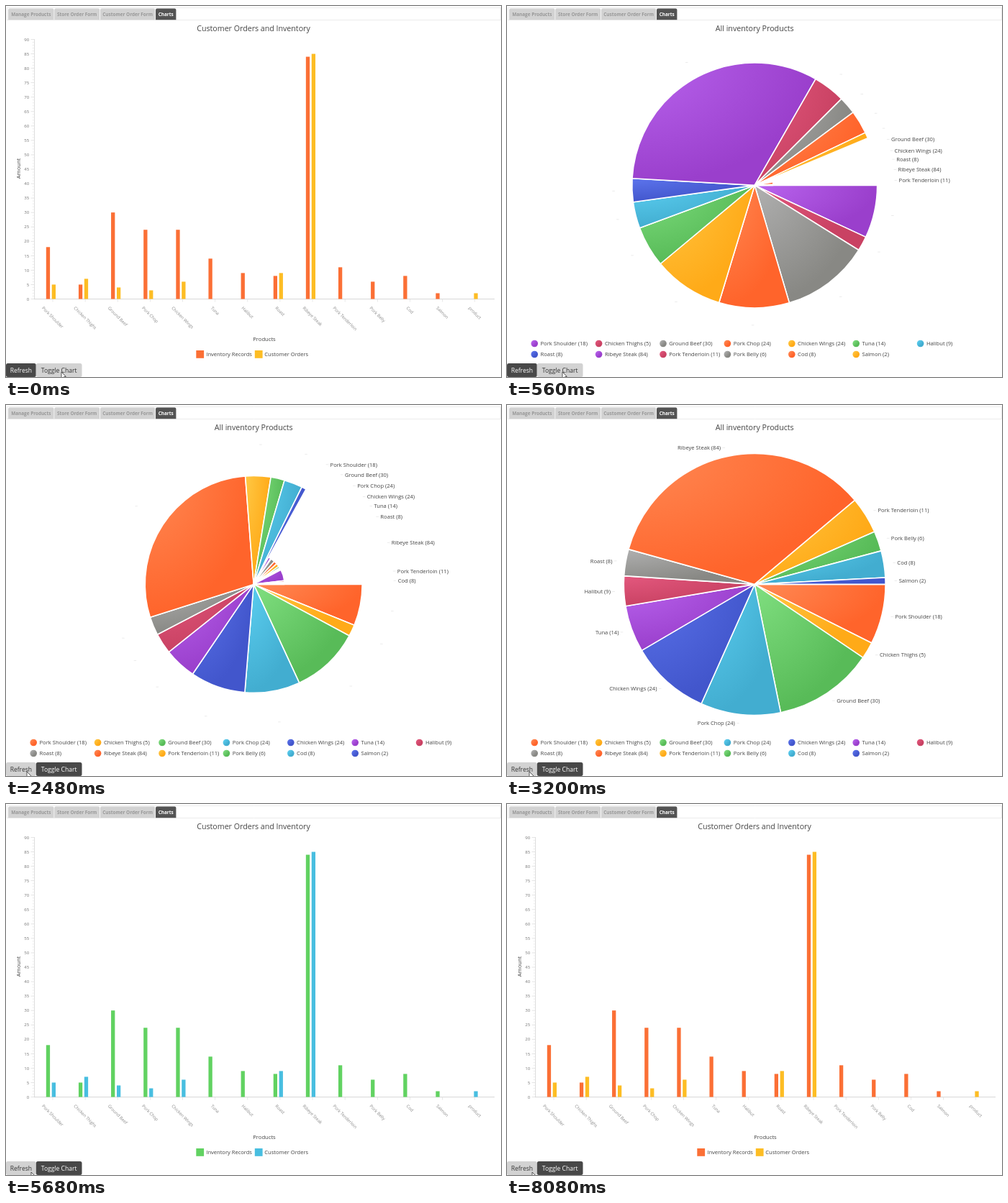
Animation of 688x516 px, one loop 8160 ms. Source, as an HTML page with a canvas:

```html
<!DOCTYPE html>
<html lang="en">
<head>
<meta charset="utf-8">
<title>Inventory charts</title>
<style>
html, body { margin: 0; width: 100%; height: 100%; overflow: hidden; background: #fff; }
canvas { display: block; }
</style>
</head>
<body>
<canvas id="stage" width="688" height="516"></canvas>
<script>
const ctx = document.getElementById('stage').getContext('2d');
const FONT = '"Open Sans", "Noto Sans", sans-serif';
const LOOP = 8160, STEP = 80;
const TAU = Math.PI * 2;

const names = ['Pork Shoulder', 'Chicken Thighs', 'Ground Beef', 'Pork Chop', 'Chicken Wings', 'Tuna',
  'Halibut', 'Roast', 'Ribeye Steak', 'Pork Tenderloin', 'Pork Belly', 'Cod', 'Salmon', 'product'];
const stock = [18, 5, 30, 24, 24, 14, 9, 8, 84, 11, 6, 8, 2, 0];
const orders = [5, 7, 4, 3, 6, 0, 0, 9, 85, 0, 0, 0, 0, 2];
const pieNames = names.slice(0, 13).map((n, i) => `${n} (${stock[i]})`);
const total = stock.reduce((a, b) => a + b);

// light and dark end of each slice gradient
const shades = [['#ff8a55', '#ff642b'], ['#ffc844', '#ffaa18'], ['#80df80', '#58bb58'], ['#5cd0f2', '#42add0'],
  ['#5c74ec', '#4256cc'], ['#b964ee', '#9a3fcc'], ['#e3587e', '#c94263'], ['#b0b0b0', '#888884']];
const barColors = ['#fb6f35', '#fdbd24', '#61d261', '#48bee0'];

const clamp = v => Math.max(0, Math.min(1, v));

// ease in and out over the first and last fifth
function ease(t) {
  t = clamp(t);
  if (t < .2) return 3.125 * t * t;
  if (t > .8) return 1 - 3.125 * (1 - t) ** 2;
  return 1.25 * t - .125;
}

function text(str, x, y, size, color = '#444', align = 'left', weight = 400) {
  ctx.font = `${weight} ${size}px ${FONT}`;
  ctx.fillStyle = color;
  ctx.textAlign = align;
  ctx.textBaseline = 'alphabetic';
  ctx.fillText(str, x, y + size * .36);
}

function rect(x, y, w, h, color) {
  ctx.fillStyle = color;
  ctx.fillRect(x, y, w, h);
}

function rounded(x, y, w, h, radii, color) {
  ctx.beginPath();
  ctx.roundRect(x, y, w, h, radii);
  ctx.fillStyle = color;
  ctx.fill();
}

function drawTabs() {
  ctx.strokeStyle = '#ececec';
  ctx.lineWidth = 1;
  ctx.strokeRect(1.5, 2.5, 686, 17);
  [['Manage Products', 3, 63.5], ['Store Order Form', 67.2, 63], ['Customer Order Form', 131, 76.2], ['Charts', 208, 28.4]]
    .forEach(([label, x, w], i) => {
      const active = i === 3;
      rounded(x, 3.4, w, 15.8, [2, 2, 0, 0], active ? '#535353' : '#d2d2d2');
      text(label, x + w / 2, 12, 6.4, active ? '#fff' : '#979797', 'center', 700);
    });
}

function drawButtons(cursor) {
  const overToggle = cursor[0] > 41.5;
  [['Refresh', 0, 41.7, !overToggle], ['Toggle Chart', 41.8, 63.7, overToggle]].forEach(([label, x, w, hover]) => {
    rounded(x, 497, w, 19, 2.5, hover ? '#d2d2d2' : '#484848');
    text(label, x + w / 2, 507, 8.55, hover ? '#333' : '#fff', 'center');
  });
}

function drawCursor([x, y]) {
  ctx.beginPath();
  [[0, 0], [0, 9], [2, 7.2], [3.5, 10.4], [5, 9.7], [3.6, 6.6], [6.3, 6.4]]
    .forEach(([dx, dy]) => ctx.lineTo(x + dx, y + dy));
  ctx.closePath();
  ctx.fillStyle = '#fff';
  ctx.fill();
  ctx.strokeStyle = '#333';
  ctx.lineWidth = .8;
  ctx.stroke();
}

/* ---- pie ---- */
const CX = 344.2, CY = 249.4, R = 181.9, LABEL_R = 194.5;

function slice(a, b, r, [light, dark]) {
  if (b - a < 1e-4 || r < .5) return;
  const angles = [a, b];
  for (let q = 0; q <= TAU + .01; q += TAU / 4) if (q > a && q < b) angles.push(q);
  const xs = [0, ...angles.map(q => r * Math.cos(q))], ys = [0, ...angles.map(q => r * Math.sin(q))];
  const left = Math.min(...xs), top = Math.min(...ys);
  ctx.beginPath();
  ctx.moveTo(CX, CY);
  ctx.arc(CX, CY, r, a, b);
  ctx.closePath();
  ctx.save();
  ctx.translate(CX + left, CY + top);
  ctx.scale(Math.max(.1, Math.max(...xs) - left), Math.max(.1, Math.max(...ys) - top));
  const fill = ctx.createRadialGradient(0, 0, 0, 0, 0, 1);
  fill.addColorStop(0, light);
  fill.addColorStop(1, dark);
  ctx.fillStyle = fill;
  ctx.fill();
  ctx.restore();
  ctx.strokeStyle = '#fff';
  ctx.lineWidth = 1.6;
  ctx.lineJoin = 'bevel';
  ctx.stroke();
}

// The incoming data grows clockwise while the outgoing data shrinks behind it.
function drawPie(time, start, oldShift, newShift) {
  const p = clamp((time - start) / 500), f = ease(p);
  const fade = clamp((time - start - 500) / 150);
  const groups = [{ share: f, r: R * f, shift: newShift, alpha: fade },
    { share: 1 - f, r: R * (1 - p), shift: oldShift, alpha: 1 }];
  const placed = [];
  let angle = 0;
  for (const g of groups) {
    if (g.share <= 0) continue;
    pieNames.forEach((label, i) => {
      const sweep = stock[i] / total * g.share * TAU, mid = angle + sweep / 2;
      slice(angle, angle + sweep, g.r, shades[(i + g.shift) % 8]);
      angle += sweep;
      placeLabel(label, mid, g.alpha, placed);
    });
  }
  const shift = p > 0 ? newShift : oldShift;
  text('All inventory Products', CX, 31, 10.7, '#444', 'center');
  pieNames.forEach((label, i) => {
    const x = 38.2 + i % 7 * 89.4, y = i < 7 ? 469.5 : 484.5;
    const [light, dark] = shades[(i + shift) % 8];
    const fill = ctx.createLinearGradient(x - 4, y - 4, x + 4, y + 4);
    fill.addColorStop(0, light);
    fill.addColorStop(.7, dark);
    ctx.beginPath();
    ctx.arc(x, y, 4.8, 0, TAU);
    ctx.fillStyle = fill;
    ctx.fill();
    text(label, x + 8.3, y, 7.6);
  });
}

// A label is left out where it would touch one already placed.
function placeLabel(label, mid, alpha, placed) {
  const right = Math.cos(mid) >= 0, dir = right ? 1 : -1;
  const ex = CX + LABEL_R * Math.cos(mid), y = CY + LABEL_R * Math.sin(mid);
  ctx.font = `400 7.6px ${FONT}`;
  const w = ctx.measureText(label).width;
  const x = ex + dir * 6, x0 = right ? x : x - w;
  if (placed.some(b => Math.abs(b.y - y) < 11.5 && x0 < b.x1 && x0 + w > b.x0)) return;
  placed.push({ y, x0, x1: x0 + w });
  rect(right ? ex : ex - 3.5, y - .4, 3.5, .8, '#e6e6e6');
  ctx.globalAlpha = alpha;
  text(label, x, y, 7.6, '#444', right ? 'left' : 'right');
  ctx.globalAlpha = 1;
}

/* ---- bars ---- */
const BASE = 407.5, UNIT = 4.011, PITCH = 45.13, FIRST = 65;

function drawBars(time, start, oldShift, newShift) {
  const p = (time - start) / 700, f = ease(p);
  text('Customer Orders and Inventory', 344, 31, 10.65, '#444', 'center');

  for (let v = 0; v <= 90; v++) {
    const y = BASE - v * UNIT, major = v % 5 === 0;
    rect(major ? 34.5 : 36.5, y - .4, major ? 4.5 : 2.5, .8, major ? '#dedede' : '#ebebeb');
    if (major) text(v, 32.3, y, 6.1, '#777', 'right');
  }
  rect(39, 46, .8, 362, '#d6d6d6');
  rect(39, BASE - .3, 640, .9, '#d2d2d2');
  names.forEach((label, i) => {
    const x = FIRST + i * PITCH;
    rect(x - .4, BASE, .8, 4, '#e2e2e2');
    ctx.font = `400 6px ${FONT}`;
    ctx.save();
    ctx.translate(x - ctx.measureText(label).width * .354, 419);
    ctx.rotate(Math.PI / 4);
    text(label, 0, 0, 6, '#888');
    ctx.restore();
  });
  ctx.save();
  ctx.translate(16.8, 226);
  ctx.rotate(-Math.PI / 2);
  text('Amount', 0, 0, 7.6, '#444', 'center');
  ctx.restore();
  text('Products', 359, 463, 7.65, '#444', 'center');

  // both generations share the slot until the old one has sunk
  const series = [];
  const add = (shift, k) => series.push([stock, shift, k], [orders, shift + 1, k]);
  if (p < 1) add(oldShift, 1 - f);
  if (p > 0) add(newShift, f);
  const slot = 15.8 / series.length;
  series.forEach(([data, color, k], s) => data.forEach((v, i) => {
    const h = v * UNIT * k;
    rect(FIRST - 9.2 + i * PITCH + slot * s, BASE - h, slot - 2.6, h, barColors[color]);
  }));

  const shift = p > 0 ? newShift : oldShift;
  rect(264.3, 479, 10.8, 10.8, barColors[shift]);
  text('Inventory Records', 278.3, 484.5, 7.55);
  rect(345.8, 479, 10.8, 10.8, barColors[shift + 1]);
  text('Customer Orders', 359.3, 484.5, 7.55);
}

/* ---- timeline ---- */
const path = [[0, 77, 509], [960, 77, 509], [1440, 29, 510], [3120, 29, 510], [3680, 65, 508],
  [5600, 65, 508], [5680, 35, 512], [LOOP, 35, 512]];

function cursorAt(time) {
  const i = path.findIndex(k => k[0] > time);
  const [t0, x0, y0] = path[i - 1], [t1, x1, y1] = path[i];
  const k = (time - t0) / (t1 - t0), e = k * k * (3 - 2 * k);
  return [x0 + (x1 - x0) * e, y0 + (y1 - y0) * e];
}

function draw(time) {
  rect(0, 0, 688, 516, '#fff');
  drawTabs();
  if (time < 80) drawBars(time, -1000, 2, 0);
  else if (time < 2098) drawPie(time, 131, 0, 5);
  else if (time < 4560) drawPie(time, 2098, 5, 0);
  else if (time < 6500) drawBars(time, 4611, 0, 2);
  else drawBars(time, 6500, 2, 0);
  const cursor = cursorAt(time);
  drawButtons(cursor);
  drawCursor(cursor);
}

const began = performance.now();
function tick() {
  const time = (performance.now() - began) % LOOP;
  draw(Math.floor(time / STEP) * STEP);
  requestAnimationFrame(tick);
}
tick();
</script>
</body>
</html>
```
